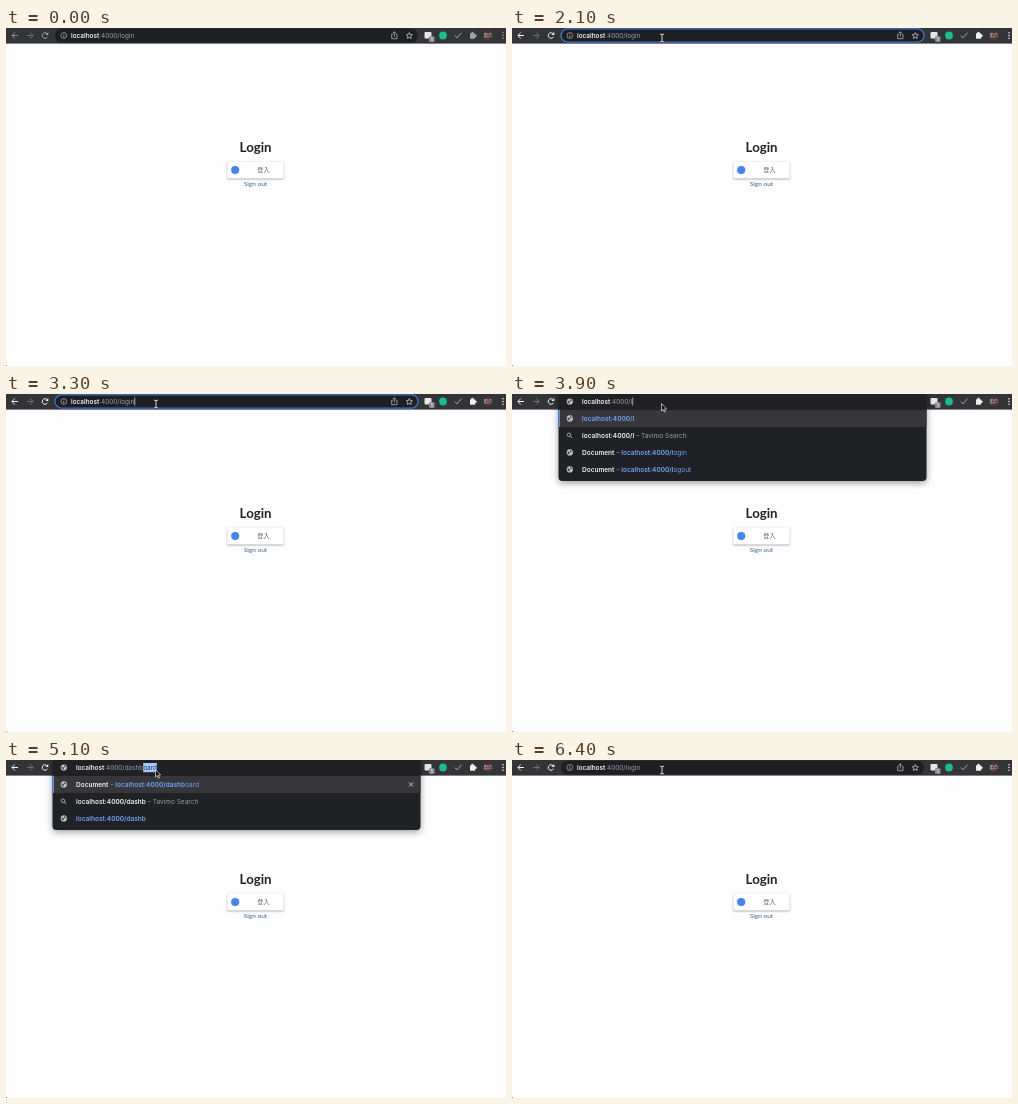
Recreate the animation shown at these times as an HTML page with a canvas. Size 500 by 338 pixels, loop 8900 ms.

```html
<!DOCTYPE html>
<html lang="en">
<head>
<meta charset="utf-8">
<title>Login redirect</title>
<style>
html, body { margin: 0; width: 100%; height: 100%; overflow: hidden; background: #fefdff; }
canvas { display: block; }
</style>
</head>
<body>
<canvas id="stage" width="500" height="338"></canvas>
<script>
const ctx = document.getElementById('stage').getContext('2d');
const LOOP = 8900;
const UI = 'Inter, "Noto Sans CJK TC", "Noto Sans CJK", sans-serif';
const LATO = 'Lato, "Noto Sans CJK TC", "Noto Sans CJK", sans-serif';
const HOST = 'localhost:4000/';
const WHITE = '#f1f2f4', GREY = '#999da3', BLUE = '#6fa5f5', DARK = '#1f2124';

// Typed path after the host: [start time, text]
const typing = [
  [3300, 'login'], [3400, 'logi'], [3500, 'log'], [3700, 'lo'], [3900, 'l'], [4000, ''],
  [4500, 'd'], [4700, 'da'], [4800, 'das'], [4900, 'dash'], [5100, 'dashb'],
  [5200, 'dashbo'], [5300, 'dashboa'], [5400, 'dashboar'], [5500, 'dashboard']
];
const OPEN = 3400, CLOSE = 5900;

function box(x, y, w, h, r, fill) {
  ctx.beginPath();
  ctx.roundRect(x, y, w, h, r);
  if (fill) { ctx.fillStyle = fill; ctx.fill(); }
}

function disc(x, y, r, fill) {
  ctx.beginPath();
  ctx.arc(x, y, r, 0, Math.PI * 2);
  ctx.fillStyle = fill;
  ctx.fill();
}

function ring(x, y, r, color, width = 0.8) {
  ctx.beginPath();
  ctx.arc(x, y, r, 0, Math.PI * 2);
  ctx.strokeStyle = color;
  ctx.lineWidth = width;
  ctx.stroke();
}

function line(color, width, ...points) {
  ctx.beginPath();
  points.forEach(([x, y], i) => i ? ctx.lineTo(x, y) : ctx.moveTo(x, y));
  ctx.strokeStyle = color;
  ctx.lineWidth = width;
  ctx.stroke();
}

function shape(fill, points) {
  ctx.beginPath();
  points.forEach(p => ctx.lineTo(...p));
  ctx.closePath();
  ctx.fillStyle = fill;
  ctx.fill();
}

function label(str, x, y, font, color, align = 'left') {
  ctx.font = font;
  ctx.fillStyle = color;
  ctx.textAlign = align;
  ctx.fillText(str, x, y);
  return x + ctx.measureText(str).width;
}

// Draws [text, color, weight] runs one after another and returns the end.
function runs(x, y, size, parts) {
  for (const [str, color, weight] of parts) x = label(str, x, y, `${weight} ${size}px ${UI}`, color);
  return x;
}

function globe(x, y) {
  disc(x, y, 3.1, '#c3c6ca');
  shape('#3a3c40', [[x - 2.3, y - 1], [x - 0.6, y - 0.6], [x + 0.2, y + 0.8], [x - 0.5, y + 2.2], [x - 2, y + 0.8]]);
  shape('#3a3c40', [[x, y - 2.4], [x + 1.9, y - 1.3], [x + 1.7, y + 0.3], [x + 0.4, y - 0.7]]);
}

function arrow(x, dir, color) {
  line(color, 1, [x - 3, 7.5], [x + 3, 7.5]);
  line(color, 1, [x + dir * 0.2, 4.5], [x + dir * 3.1, 7.5], [x + dir * 0.2, 10.5]);
}

function cross(x, y, r, color) {
  line(color, 0.9, [x - r, y - r], [x + r, y + r]);
  line(color, 0.9, [x - r, y + r], [x + r, y - r]);
}

function reload(color) {
  ctx.beginPath();
  ctx.arc(39, 7.5, 2.8, 0.5, 5.5);
  ctx.strokeStyle = color;
  ctx.lineWidth = 1;
  ctx.stroke();
  shape(color, [[42.3, 4], [42.3, 7.1], [39.3, 7.1]]);
}

function star(x, y, color) {
  const points = Array.from({ length: 11 }, (_, i) => {
    const a = -Math.PI / 2 + i * Math.PI / 5, r = i % 2 ? 1.5 : 3.3;
    return [x + r * Math.cos(a), y + r * Math.sin(a)];
  });
  line(color, 0.8, ...points);
}

function toolbar(active, loading) {
  ctx.fillStyle = '#333438';
  ctx.fillRect(0, 0, 500, 15.6);
  const tone = active ? '#f0f0f1' : '#a0a2a5';
  arrow(9, -1, active ? tone : '#8e9093');
  arrow(24, 1, '#707276');
  if (loading) cross(39, 7.5, 2.5, tone); else reload(tone);

  box(418.5, 4, 7, 6.5, 1, '#e5e6e7');
  box(423, 8.3, 5.6, 5.6, 1, '#85898d');
  label('1', 425.8, 12.8, `600 4.5px ${UI}`, '#fff', 'center');
  disc(437, 7.5, 3.9, '#18bd8b');
  line('#a4a8a9', 1, [448.8, 7.6], [451, 9.9], [455.5, 4.7]);
  box(464, 5.2, 5.2, 5.5, 0.6, tone);
  disc(466.4, 4.9, 1.2, tone);
  disc(469.5, 7.8, 1.2, tone);
  disc(482, 7.5, 5, '#4c3532');
  label('用戶', 482, 9.2, `500 4.4px ${UI}`, '#e3dad7', 'center');
  for (const y of [4.7, 7.5, 10.3]) disc(497, y, 0.8, tone);
}

function addressBar(path, focus, caret) {
  box(49, 0.8, 363, 13.6, 6.8, '#1d1f22');
  if (focus) {
    ctx.globalAlpha = focus;
    box(49, 0.8, 363, 13.4, 6.7);
    ctx.strokeStyle = '#3f73c7';
    ctx.lineWidth = 1.3;
    ctx.stroke();
    ctx.globalAlpha = 1;
  }
  ring(57.8, 7.5, 2.9, '#b4b7bb', 0.7);
  line('#b4b7bb', 0.8, [57.8, 7], [57.8, 9.3]);
  line('#b4b7bb', 0.8, [57.8, 5.5], [57.8, 6.2]);
  const end = runs(65, 9.8, 6.4, [['localhost', WHITE, 600], [':4000/' + path, GREY, 400]]);
  if (caret) line('#e4e5e7', 0.7, [end + 0.5, 3.7], [end + 0.5, 11.5]);

  const tone = '#c3c5c8';
  line(tone, 0.7, [386.8, 6.2], [385.7, 6.2], [385.7, 10.7], [391, 10.7], [391, 6.2], [389.9, 6.2]);
  line(tone, 0.7, [388.35, 8.6], [388.35, 3.8]);
  line(tone, 0.7, [386.8, 5.2], [388.35, 3.7], [389.9, 5.2]);
  star(403.3, 7.8, tone);
}

function suggestions(path) {
  const typed = HOST + path;
  const search = { icon: 'search', parts: [[typed, WHITE, 600], [' – Tavimo Search', GREY, 400]] };
  const plain = { parts: [[typed, BLUE, 600]] };
  const page = name => ({
    parts: [['Document', WHITE, 600], [' – ', GREY, 400], [typed, BLUE, 600], [name.slice(path.length), BLUE, 400]]
  });
  if (path[0] === 'd') {
    const first = { ...page('dashboard'), close: true };
    return path === 'dashboard' ? [first, search] : [first, search, plain];
  }
  const pages = ['login', path ? 'logout' : 'dashboard'].filter(name => name.startsWith(path));
  return [plain, search, ...pages.map(page)];
}

function popup(path) {
  const rows = suggestions(path);
  ctx.save();
  ctx.shadowColor = 'rgba(0,0,0,.4)';
  ctx.shadowBlur = 7;
  ctx.shadowOffsetY = 2;
  box(46.5, -4, 368, 23 + rows.length * 17, 4, DARK);
  ctx.restore();

  globe(57.8, 7.5);
  let end = runs(70, 9.8, 6.4, [['localhost', WHITE, 600], [':4000/' + path, GREY, 400]]);
  if (path[0] === 'd' && path !== 'dashboard') {
    const rest = 'dashboard'.slice(path.length);
    ctx.font = `400 6.4px ${UI}`;
    ctx.fillStyle = '#a5c8fb';
    ctx.fillRect(end, 3, ctx.measureText(rest).width, 9.2);
    label(rest, end, 9.8, ctx.font, '#26364e');
  } else {
    line('#d4d6d9', 0.7, [end + 0.5, 3.7], [end + 0.5, 11.5]);
  }

  ctx.fillStyle = '#37373b';
  ctx.fillRect(46.5, 16, 368, 17);
  ctx.fillStyle = '#5b94eb';
  ctx.fillRect(46.5, 16, 1.5, 17);
  rows.forEach(({ icon, parts, close }, i) => {
    const y = 24.4 + i * 17;
    if (icon === 'search') {
      ring(57, y - 0.6, 1.8, '#b9bcc0');
      line('#b9bcc0', 0.9, [58.3, y + 0.7], [60.3, y + 2.7]);
    } else {
      globe(57.8, y);
    }
    runs(70, y + 2.3, 6.5, parts);
    if (close) cross(405, y, 2, '#dcdddf');
  });
}

function page(t) {
  ctx.fillStyle = '#fefdff';
  ctx.fillRect(0, 0, 500, 338);
  ctx.fillStyle = '#8d8d90';
  ctx.fillRect(0, 337, 1, 1);
  if (t >= 6000 && t < 6200) return;
  label('Login', 249.6, 123.6, `700 13.3px ${LATO}`, '#222326', 'center');
  label('Sign out', 249.5, 157.8, `400 6.5px ${LATO}`, '#356795', 'center');
  if (t >= 6200 && t < 6300) return;
  ctx.save();
  ctx.shadowColor = 'rgba(0,0,0,.38)';
  ctx.shadowBlur = 2;
  ctx.shadowOffsetY = 0.8;
  box(221.3, 133.5, 56.4, 17, 0.6, '#fff');
  ctx.restore();
  disc(229.2, 142, 4.1, '#4285f4');
  label('登入', 257.5, 144.1, `400 6.2px ${LATO}`, '#66676a', 'center');
}

function pointer(x, y) {
  const outline = [[0, 0], [0, 7.5], [1.7, 6], [2.9, 8.6], [4, 8.1], [2.9, 5.6], [5.1, 5.4]]
    .map(([dx, dy]) => [x + dx, y + dy]);
  shape('#111', outline);
  line('#eee', 0.7, ...outline, outline[0]);
}

function beam(x, y) {
  for (const [color, width] of [['#222', 1.8], ['#e6e6e6', 0.9]]) {
    line(color, width, [x - 2, y - 4], [x, y - 3.2], [x + 2, y - 4]);
    line(color, width, [x, y - 3.2], [x, y + 3.2]);
    line(color, width, [x - 2, y + 4], [x, y + 3.2], [x + 2, y + 4]);
  }
}

function cursor(t, open) {
  if (t < 300) return;
  if (open) return pointer(149.5, 9.5);
  const p = Math.min(1, (t - 300) / 800);
  const left = (1 - p) ** 2;
  const x = 150 + 32 * left, y = 10 + 215 * left;
  if (y < 16) beam(x, y); else pointer(x, y);
}

function draw(now) {
  const t = Math.floor((now % LOOP) / 100) * 100;
  const open = t >= OPEN && t < CLOSE;
  const focus = t >= 1300 && t < OPEN ? (t < 1400 ? 0.6 : 1) : 0;
  const caret = focus && (t < 1800 || (t >= 2300 && t < 2700) || t >= 3300);
  page(t);
  toolbar(t >= 1300, t >= CLOSE && t < 6300);
  if (open) {
    popup(typing.findLast(([start]) => t >= start)[1]);
  } else {
    addressBar(t >= CLOSE && t < 6200 ? 'dashboard' : 'login', focus, caret);
  }
  cursor(t, open);
}

const start = performance.now();
function tick() {
  draw(performance.now() - start);
  requestAnimationFrame(tick);
}
tick();
</script>
</body>
</html>
```
